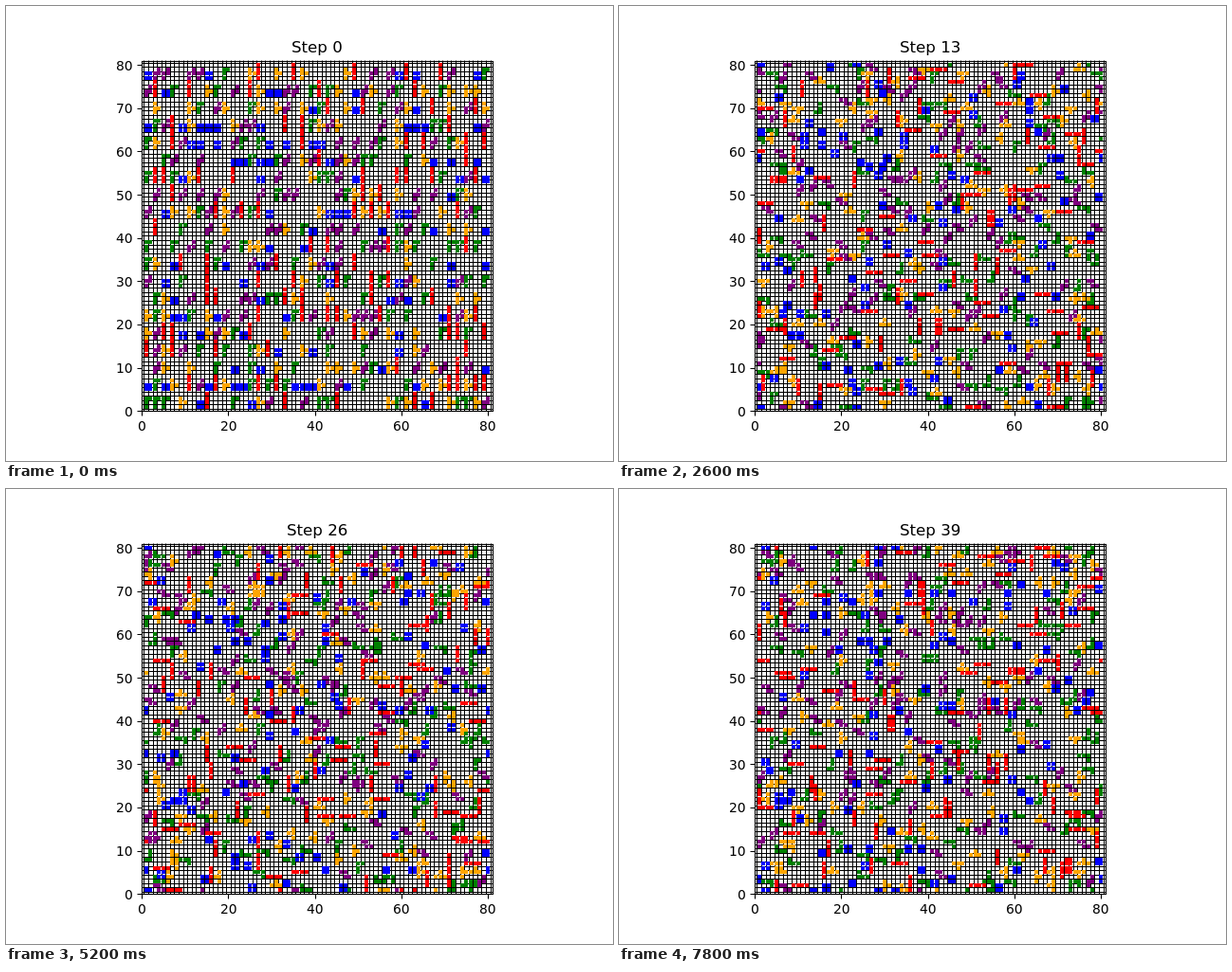
Animation, 640 px wide and 480 px high, one loop 8 s. Source, as an HTML page:

```html
<!DOCTYPE html>
<html lang="en">
<head>
<meta charset="utf-8">
<title>Lattice steps</title>
<style>
  html, body { margin: 0; width: 100%; height: 100%; overflow: hidden; background: #fff; }
  svg { display: block; width: 640px; height: 480px; font-family: "DejaVu Sans", sans-serif; }
</style>
</head>
<body>
<svg id="stage" viewBox="0 0 640 480"></svg>
<script>
const SITES = 80, STEPS = 40, STEP_MS = 200, PIECES = 500;
const LEFT = 143.2, TOP = 57.6, SIZE = 369.6, BOTTOM = TOP + SIZE;
const UNIT = SIZE / (SITES + 1);
const MARK = 4;

// Cells of each shape as [x, y], y upwards
const KINDS = [
  { color: '#0000ff', cells: [[0, 0], [1, 0], [0, 1], [1, 1]] },
  { color: '#ff0000', cells: [[0, 0], [0, 1], [0, 2], [0, 3]] },
  { color: '#800080', cells: [[0, 0], [0, 1], [1, 1], [1, 2]] },
  { color: '#008000', cells: [[0, 0], [0, 1], [0, 2], [1, 2]] },
  { color: '#ffa500', cells: [[0, 0], [0, 1], [0, 2], [1, 1]] }
];
const DIRS = [[1, 0], [-1, 0], [0, 1], [0, -1]];

const px = u => LEFT + u * UNIT;
const py = u => BOTTOM - u * UNIT;
const wrap = n => (n + SITES) % SITES;

function makeRandom(seed) {
  return () => {
    seed = (seed + 0x6D2B79F5) | 0;
    let t = Math.imul(seed ^ (seed >>> 15), 1 | seed);
    t = (t + Math.imul(t ^ (t >>> 7), 61 | t)) ^ t;
    return ((t ^ (t >>> 14)) >>> 0) / 4294967296;
  };
}
const random = makeRandom(2024);
const pick = n => Math.floor(random() * n);

function shuffle(list) {
  for (let i = list.length - 1; i > 0; i--) {
    const j = pick(i + 1);
    [list[i], list[j]] = [list[j], list[i]];
  }
  return list;
}

// Pieces start upright in slots two sites wide and four high
function placePieces() {
  const columns = SITES / 2;
  const slots = shuffle(Array.from({ length: columns * SITES / 4 }, (_, i) => i));
  return slots.slice(0, PIECES).map((slot, i) => {
    const kind = KINDS[i % KINDS.length];
    const x = slot % columns * 2, y = Math.floor(slot / columns) * 4;
    return { kind, cells: kind.cells.map(([dx, dy]) => [x + dx, y + dy]) };
  });
}

const siteOf = ([x, y]) => y * SITES + x;

function tryMove(piece, taken, change) {
  const next = piece.cells.map(change).map(([x, y]) => [wrap(x), wrap(y)]);
  piece.cells.forEach(c => taken.delete(siteOf(c)));
  if (!next.some(c => taken.has(siteOf(c)))) piece.cells = next;
  piece.cells.forEach(c => taken.add(siteOf(c)));
}

function shift(piece, taken) {
  const [dx, dy] = DIRS[pick(4)];
  tryMove(piece, taken, ([x, y]) => [x + dx, y + dy]);
}

function turn(piece, taken) {
  const [cx, cy] = piece.cells[1];
  const sign = pick(2) ? 1 : -1;
  const near = d => d > SITES / 2 ? d - SITES : d < -SITES / 2 ? d + SITES : d;
  tryMove(piece, taken, ([x, y]) => [cx - sign * near(y - cy), cy + sign * near(x - cx)]);
}

function outline(pieces, kind) {
  return pieces.filter(p => p.kind === kind).flatMap(p => p.cells).map(([x, y]) => {
    const mx = Math.round(px(x + 1)) - MARK / 2, my = Math.round(py(y + 1)) - MARK / 2;
    return `M${mx} ${my}h${MARK}v${MARK}h-${MARK}z`;
  }).join('');
}

function simulate() {
  const pieces = placePieces();
  const taken = new Set(pieces.flatMap(p => p.cells.map(siteOf)));
  return Array.from({ length: STEPS }, (_, step) => {
    if (step) {
      for (const piece of shuffle(pieces.slice())) {
        shift(piece, taken);
        if (piece.kind !== KINDS[0]) turn(piece, taken);
      }
    }
    return KINDS.map(kind => outline(pieces, kind));
  });
}

const stage = document.getElementById('stage');
function add(name, attrs) {
  const node = document.createElementNS('http://www.w3.org/2000/svg', name);
  for (const key in attrs) node.setAttribute(key, attrs[key]);
  return stage.appendChild(node);
}

// Starts the text on a whole pixel; align is the share of its width left of x
function setText(node, text, x, align) {
  node.textContent = text;
  node.setAttribute('x', Math.round(x - node.getComputedTextLength() * align));
}

function label(text, x, y, align) {
  setText(add('text', { y: Math.round(y), 'font-size': 13.89 }), text, x, align);
}

const snap = v => Math.round(v) + 0.5;
let grid = '', ticks = '';
for (let i = 0; i <= SITES; i++) {
  grid += `M${snap(px(i + 0.5))} ${TOP}V${BOTTOM}M${LEFT} ${snap(py(i + 0.5))}H${LEFT + SIZE}`;
}
add('path', { d: grid, stroke: '#000', 'stroke-width': 1 });
const layers = KINDS.map(kind => add('path', { fill: kind.color, 'shape-rendering': 'crispEdges' }));

for (let v = 0; v <= SITES; v += 10) {
  ticks += `M143.5 ${snap(py(v))}h-5`;
  label(v, 133.5, py(v) + 5.5, 1);
  if (v % 20) continue;
  ticks += `M${snap(px(v))} 427.5v5`;
  label(v, px(v), 447.7, 0.5);
}
add('path', { d: ticks, stroke: '#000', 'stroke-width': 1.11 });
add('rect', { x: 143.5, y: 58.5, width: 370, height: 369, fill: 'none', stroke: '#000', 'stroke-width': 1.11 });
const title = add('text', { y: 49, 'font-size': 16.67 });

const states = simulate();
let shown = -1;
function draw(now) {
  const step = Math.floor(now / STEP_MS) % STEPS;
  if (step !== shown) {
    shown = step;
    setText(title, `Step ${step}`, 328, 0.5);
    states[step].forEach((d, i) => layers[i].setAttribute('d', d));
  }
}

const start = performance.now();
function tick() {
  draw(performance.now() - start);
  requestAnimationFrame(tick);
}
tick();
</script>
</body>
</html>
```
